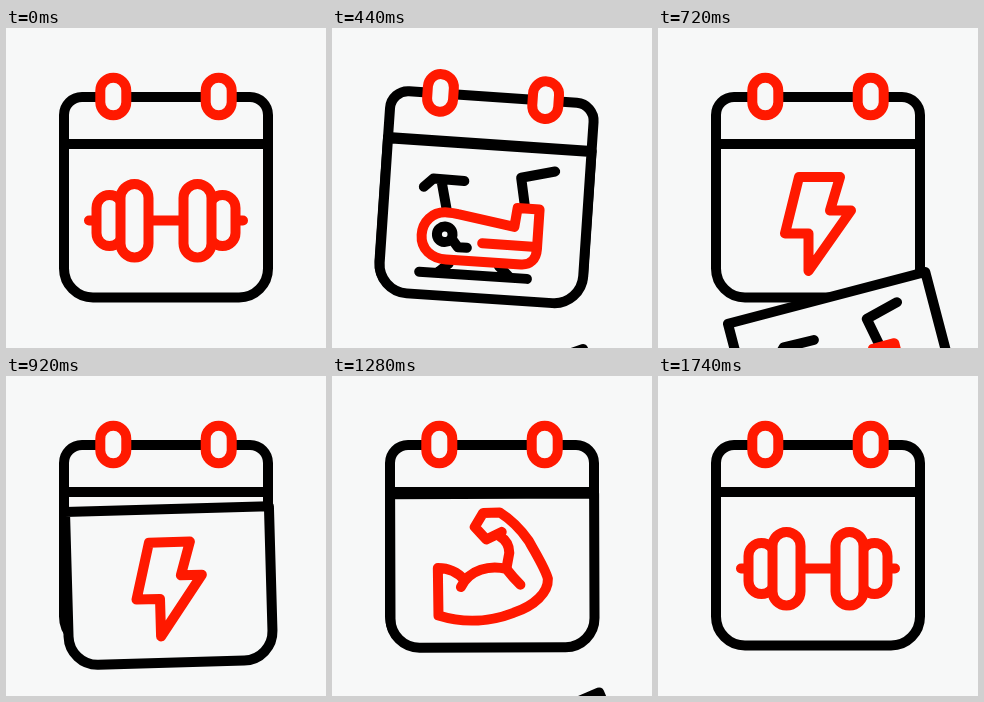
Animation of 320x320 px, one loop 2.06 s. Source, as an HTML page with a canvas:

```html
<!DOCTYPE html>
<html lang="en">
<head>
<meta charset="utf-8">
<title>Workout calendar</title>
<style>
  html, body { margin: 0; width: 100%; height: 100%; overflow: hidden; background: #f7f8f8; }
  canvas { display: block; width: 100vw; height: 100vh; }
</style>
</head>
<body>
<canvas id="stage"></canvas>
<script>
const SIZE = 320, LOOP = 2060, STEP = 20, REST = 1740;
const BG = '#f7f8f8', RED = '#ff1900', INK = '#000';
const START = 2, GAP = 417, FALL = 542, DROP = 266, TURN = -25.2;
const canvas = document.getElementById('stage');
const ctx = canvas.getContext('2d');

const clamp = u => Math.max(0, Math.min(1, u));
const ease = u => u * u * (3 - 2 * u);
const rad = deg => deg * Math.PI / 180;

function draw(d, color = RED, fill = false) {
  const p = new Path2D(d);
  if (fill) { ctx.fillStyle = BG; ctx.fill(p); }
  ctx.strokeStyle = color;
  ctx.stroke(p);
}

// Rounded box with separate top and bottom radii
function box(x, y, w, h, top, bottom, color) {
  ctx.beginPath();
  ctx.roundRect(x, y, w, h, [top, top, bottom, bottom]);
  ctx.fillStyle = BG;
  ctx.fill();
  ctx.strokeStyle = color;
  ctx.stroke();
}

function turnAbout(x, y, deg) {
  ctx.translate(x, y);
  ctx.rotate(rad(deg));
  ctx.translate(-x, -y);
}

function dumbbell() {
  draw('M83 192.5H90M230 192.5H237M142 192.5H178');
  for (const x of [90.5, 203.5]) box(x, 167, 26, 51, 13, 13, RED);
  for (const x of [114.5, 177.5]) box(x, 156, 28, 73.5, 14, 14, RED);
}

function bike() {
  draw('M97 162L106 153L137 153.5M114 154L121 182M227 138L193.5 146.5L199 174', INK);
  draw('M98 247H206M127 237L116 247M177 236L188 246', INK);
  draw('M122 186C107 186 98 197 98 210C98 224 109 233 124 233H199' +
    'C208 233 214 227 214 217V177H192L190 196L133 187Q128 186 122 186Z', RED, true);
  draw('M159 214.5H213');
  ctx.beginPath();
  ctx.arc(121, 208, 7.8, 0, 7);
  ctx.strokeStyle = INK;
  ctx.stroke();
  draw('M129 213L135 220H144', INK);
}

function bolt() {
  draw('M141 149H182L172 182.5H193L150.5 243V205.5H127Z');
}

function arm() {
  draw('M132 202C125 194 116 190 105.5 190L106 237.5C133 246 160 243 181 235' +
    'C202 228 216 215 215.5 201C213 191 203 175 196.5 163Q184 145 167.5 134.5' +
    'L151 135L142.5 149L154 161.5L169.5 154');
  draw('M167 158Q177 164 177 175L174 191');
  draw('M128.5 209C137 191 158 187 174 191Q181 200 188 207');
}

const icons = [dumbbell, bike, bolt, arm];

function page(i, t) {
  const u = (t - START - i * GAP) / FALL;
  if (u <= 0 || u >= 1) return;
  const e = ease(u);
  ctx.save();
  ctx.translate(0, DROP * e);
  turnAbout(160, 82, TURN * e);
  box(58, 116, 204, 153.5, 0, 29, INK);
  icons[i]();
  ctx.restore();
}

function sway(t) {
  const keys = [[70, 0], [290, -8.5], [535, 10.2], [710, 0]];
  let angle = 0;
  for (let i = 1; i < keys.length; i++) {
    const [a, from] = keys[i - 1], [b, to] = keys[i];
    angle += (to - from) * ease(clamp((t - a) / (b - a)));
  }
  return angle;
}

function render(time) {
  const t = Math.min(REST, Math.floor(time % LOOP / STEP) * STEP);
  const torn = Math.max(0, Math.min(4, Math.ceil((t - START) / GAP)));
  ctx.setTransform(canvas.width / SIZE, 0, 0, canvas.height / SIZE, 0, 0);
  ctx.fillStyle = BG;
  ctx.fillRect(0, 0, SIZE, SIZE);
  ctx.lineWidth = 10;
  ctx.lineCap = ctx.lineJoin = 'round';

  turnAbout(160, 84, sway(t));
  box(58, 69, 204, 200.5, 18, 29, INK);
  draw('M58 116H262', INK);
  for (const x of [107.3, 212.7]) box(x - 13, 49.7, 26, 37.6, 13, 13, RED);
  icons[torn % 4]();
  for (let i = 3; i >= 0; i--) page(i, t);
}

function fit() {
  const k = window.devicePixelRatio || 1;
  canvas.width = Math.round(innerWidth * k);
  canvas.height = Math.round(innerHeight * k);
}

fit();
addEventListener('resize', fit);
const origin = performance.now();
function tick() {
  render(performance.now() - origin);
  requestAnimationFrame(tick);
}
tick();
</script>
</body>
</html>
```
